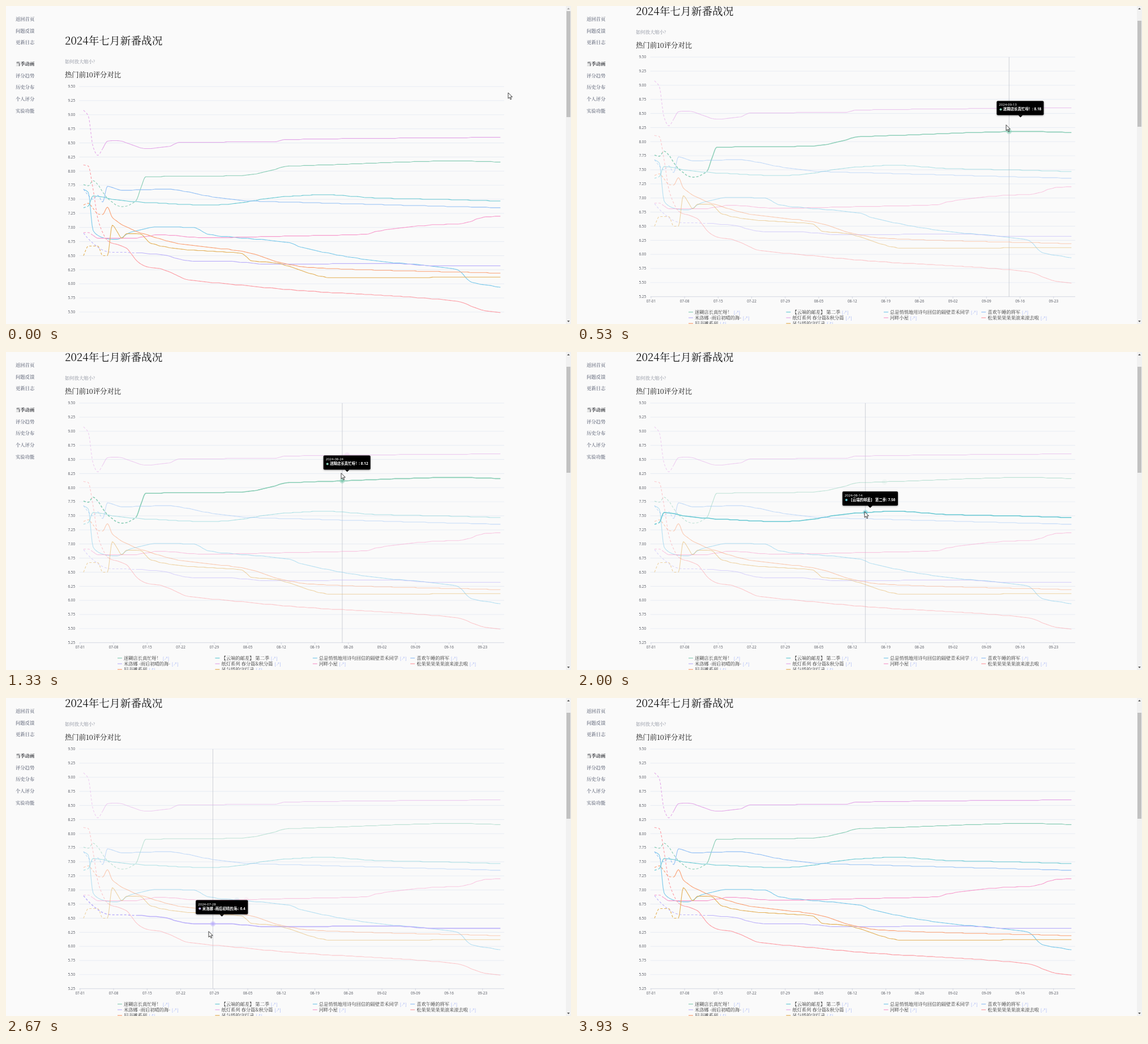
Recreate the animation shown at these times as an HTML page. Size 998 by 561 pixels, loop 4140 ms.

```html
<!DOCTYPE html>
<html lang="zh-CN">
<head>
<meta charset="utf-8">
<style>
html, body { margin: 0; width: 100%; height: 100%; overflow: hidden; background: #fafafa; }
svg { position: absolute; left: 0; top: 0; }
.serif { font-family: "Noto Serif CJK SC", "Noto Serif SC", "Noto Serif", "Noto Sans CJK SC", "Noto Sans CJK", serif; }
.sans { font-family: "Noto Sans", "Noto Sans CJK SC", "Noto Sans CJK", sans-serif; }
#tip {
  position: absolute; left: 0; top: 0; height: 16px; padding: 3px 4.5px 5.5px 4px;
  background: #000; color: #fff; border-radius: 2px; box-shadow: 0 1px 3px rgba(0,0,0,.4);
  font-size: 6.4px; line-height: 8px; font-weight: 700; white-space: pre;
}
#tip::after {
  content: ""; position: absolute; left: 50%; bottom: -4px; margin-left: -4px;
  border: 4px solid transparent; border-top-color: #000; border-bottom: 0;
}
#date { font-size: 6px; font-weight: 500; }
#dot { display: inline-block; width: 4px; height: 4px; border-radius: 50%; margin: 0 3px 1px 0.5px; vertical-align: middle; }
</style>
</head>
<body>
<svg id="stage" width="998" height="561" viewBox="0 0 998 561"></svg>
<div id="tip" class="sans"><div id="date"></div><div><span id="dot"></span><span id="label"></span></div></div>
<svg id="top" width="998" height="561" viewBox="0 0 998 561"></svg>
<script>
const LOOP = 4140, FRAMES = 62, LAST_DAY = 87;
const byId = id => document.getElementById(id);

function add(parent, tag, attrs, text) {
  const el = document.createElementNS('http://www.w3.org/2000/svg', tag);
  for (const k in attrs) el.setAttribute(k, attrs[k]);
  if (text != null) el.textContent = text;
  parent.appendChild(el);
  return el;
}
function write(parent, x, cy, size, fill, text, more) {
  return add(parent, 'text', { x, y: cy + size * 0.36, 'font-size': size, fill, class: 'serif', ...more }, text);
}
const X = day => 136.9 + day * 8.464;
const Y = v => 142.1 + (9.5 - v) * 99.45;
const AXIS = Y(5.25);

// Monotone cubic through the points (d[i], v[i])
function smooth(d, v) {
  const slope = d.slice(1).map((x, i) => (v[i + 1] - v[i]) / (x - d[i]));
  const tan = d.map((_, i) => {
    const a = slope[i - 1] ?? slope[i], b = slope[i] ?? a;
    return a * b <= 0 ? 0 : 2 * a * b / (a + b);
  });
  return x => {
    let i = 0;
    while (i < d.length - 2 && x > d[i + 1]) i++;
    const h = d[i + 1] - d[i], s = (x - d[i]) / h, s2 = s * s, s3 = s2 * s;
    return v[i] * (2 * s3 - 3 * s2 + 1) + v[i + 1] * (3 * s2 - 2 * s3)
      + h * (tan[i] * (s3 - 2 * s2 + s) + tan[i + 1] * (s3 - s2));
  };
}
// A score in hundredths, rounded once a day, from a few turning points (day, score)
function line(name, color, dashEnd, ...points) {
  const trend = smooth(points.filter((_, i) => i % 2 == 0), points.filter((_, i) => i % 2));
  const days = Array.from({ length: LAST_DAY + 1 }, (_, i) => i);
  return { name, color, dashEnd, at: smooth(days, days.map(d => Math.round(trend(d)) / 100)) };
}
const series = [
  line('迷糊店长真忙呀！', '#86ccb4', 11, 0,776, 1,774, 2,783, 5,752, 8,737, 11,748, 13,790, 33,792, 39,801, 42,808, 54,812, 78,818, 87,816),
  line('【云端的邮差】 第二季', '#66c8d2', 1, 0,735, 1,738, 2,756, 7,749, 14,744, 26,740, 30,741, 38,751, 44,756, 50,758, 62,752, 74,750, 87,747),
  line('总是悄悄地用诗句回信的隔壁青禾同学', '#78c8ea', 0, 0,768, 1,762, 2,695, 4,682, 7,679, 10,692, 16,701, 23,700, 26,688, 43,673, 45,666, 60,642, 78,625, 81,603, 87,594),
  line('喜欢午睡的将军', '#92bff5', 4, 0,768, 2,750, 3,757, 4,745, 5,773, 8,766, 17,768, 28,753, 35,747, 43,745, 87,735),
  line('米洛娜 -雨后初晴的海-', '#bdb2fa', 11, 0,690, 2,672, 5,657, 11,655, 16,652, 23,640, 30,640, 38,635, 65,636, 73,632, 87,632),
  line('纸灯系列 春分篇&秋分篇', '#e3a7e8', 4, 0,908, 1,898, 2,843, 3,828, 5,853, 7,854, 13,840, 18,844, 20,851, 40,852, 42,856, 87,860),
  line('河畔小屋', '#f799cc', 2, 0,691, 1,691, 3,681, 10,681, 16,687, 25,682, 44,685, 59,688, 61,693, 72,704, 79,707, 84,719, 87,720),
  line('松果果果果果滚来滚去啦', '#fd9aa2', 5, 0,811, 1,809, 3,715, 5,677, 9,663, 11,642, 13,631, 16,627, 22,607, 30,600, 44,589, 78,569, 83,554, 87,549),
  line('旧书摊系列', '#fa9f72', 4, 0,740, 1,743, 3,724, 4,723, 5,736, 6,718, 10,697, 14,685, 20,671, 33,658, 43,634, 49,628, 87,619),
  line('风与塔的守灯录', '#e3af55', 5, 0,650, 1,667, 3,667, 4,650, 5,650, 6,704, 8,681, 9,689, 12,688, 14,672, 21,661, 33,654, 35,641, 40,637, 52,611, 87,612)
];

// Static page
const stage = byId('stage'), page = add(stage, 'g', {});
write(page, 104, 61, 18.7, '#111', '2024年七月新番战况');
write(page, 104, 98, 8.3, '#858a98', '如何放大缩小?', { 'font-weight': 500 });
write(page, 104, 121.3, 12.35, '#111', '热门前10评分对比', { 'font-weight': 500 });

for (let i = 0; i <= 17; i++) {
  const v = 9.5 - i / 4, y = Y(v);
  add(page, 'path', { d: `M129.5 ${y}H880`, stroke: i == 17 ? '#c4cad8' : '#e0e6f1', 'stroke-width': 0.7 });
  write(page, 122, y, 6.3, '#5c5f68', v.toFixed(2), { class: 'sans', 'text-anchor': 'end' });
}
const dateOf = day => new Date(Date.UTC(2024, 6, 1 + day)).toISOString().slice(0, 10);
for (let week = 0; week <= 12; week++) {
  const x = 130.8 + week * 59.25;
  add(page, 'path', { d: `M${x} ${AXIS}v3`, stroke: '#c4cad8', 'stroke-width': 0.7 });
  write(page, x, AXIS + 7.8, 6.4, '#5c5f68', dateOf(week * 7).slice(5), { class: 'sans', 'text-anchor': 'middle' });
}
const pointer = add(page, 'path', { stroke: '#bcbfc8', 'stroke-width': 0.7 });

function curve(at, from, to) {
  const pts = [];
  for (let d = from; d <= to + 0.01; d += 0.2) pts.push(X(d).toFixed(1) + ' ' + Y(at(d)).toFixed(2));
  return 'M' + pts.join('L');
}
series.forEach((s, i) => {
  s.g = add(page, 'g', { fill: 'none', stroke: s.color, 'stroke-linejoin': 'round' });
  if (s.dashEnd) add(s.g, 'path', { d: curve(s.at, 0, s.dashEnd), 'stroke-dasharray': '4 3' });
  add(s.g, 'path', { d: curve(s.at, s.dashEnd, LAST_DAY) });

  const x = 197 + (i % 4) * 172.4, y = 592.5 + (i >> 2) * 10;
  add(page, 'path', { d: `M${x} ${y - 0.5}h8`, stroke: s.color, 'stroke-width': 1.2 });
  const t = write(page, x + 11, y, 8.25, '#2b2b2b', s.name, { 'font-weight': 500 });
  add(t, 'tspan', { dx: 3, 'font-size': 6.6, fill: '#8fa3f5' }, '[↗]');
});
const dots = add(page, 'g', {});

['返回首页', '问题反馈', '更新日志', '当季动画', '评分趋势', '历史分布', '个人评分', '实验功能'].forEach((s, i) =>
  write(stage, 17, 23 + i * 20.7 + (i > 2 ? 17 : 0), 8.3, i == 3 ? '#33353b' : '#7f8493', s, { 'font-weight': 600 }));

add(stage, 'rect', { x: 989, y: 0, width: 9, height: 561, fill: '#f1f1f1' });
const thumb = add(stage, 'rect', { x: 990, width: 7, height: 187, fill: '#c1c1c1' });
const upArrow = add(stage, 'path', { d: 'M991.2 6l2.3-2.8 2.3 2.8z' });
add(stage, 'path', { d: 'M991.2 555l2.3 2.8 2.3-2.8z', fill: '#505050' });

const cursor = add(byId('top'), 'path', {
  d: 'M0 0V10.2L2.4 8 4 11.9 5.7 11.2 4.1 7.4H7.3Z', fill: '#fff', stroke: '#111', 'stroke-width': 0.8
});

// The cursor's path: time, x, y
const route = [[0, 887, 153], [140, 885, 155], [400, 790, 185], [530, 758, 209.7], [800, 700, 188],
  [1130, 608, 197], [1330, 592, 213.7], [2000, 508, 281.7], [2670, 358, 411.7], [3070, 214, 493],
  [3200, 170, 529], [3670, 74, 570]];
function cursorAt(t) {
  const i = Math.max(1, route.findIndex(k => k[0] >= t));
  const [t0, x0, y0] = route[i - 1], [t1, x1, y1] = route[i];
  const p = Math.max(0, (t - t0) / (t1 - t0));
  return [x0 + (x1 - x0) * p, y0 + (y1 - y0) * p];
}
const scrollAt = t => 52 * (1 - (1 - Math.min(1, t / 340)) ** 3);
const timeOf = i => Math.round(i * 6.667) * 10;

// The chart reacts a little late, to the curve nearest the cursor
function hoverAt(t) {
  const [x, y] = cursorAt(Math.min(t, 3670) - 36);
  if (x > 880 || y > 513) return null;
  const day = Math.min(LAST_DAY, Math.round((x - X(0)) / (X(1) - X(0))));
  const gap = s => Math.abs(Y(s.at(day)) - scrollAt(t) - y);
  return { day, s: series.reduce((a, b) => gap(b) < gap(a) ? b : a) };
}

// Each frame eases from the one before
function buildFrames() {
  const frames = [];
  let look = series.map(() => ({ opacity: 1, width: 1.1, glow: 0, day: 0 })), tip = null;
  for (let i = 0; i <= FRAMES; i++) {
    const t = timeOf(i), hover = hoverAt(t), rate = hover ? 0.85 : 0.4;
    look = look.map((l, k) => {
      const on = hover?.s == series[k];
      return {
        opacity: l.opacity + ((!hover || on ? 1 : 0.52) - l.opacity) * rate,
        width: l.width + ((on ? 1.6 : 1.1) - l.width) * rate,
        glow: on ? 1 : l.glow * 0.65,
        day: on ? hover.day : l.day
      };
    });
    if (hover) {
      const goal = [X(hover.day), Y(hover.s.at(hover.day)) - scrollAt(t) - 9];
      tip = tip ? tip.map((v, k) => v + (goal[k] - v) * 0.5) : goal;
    } else tip = null;
    frames.push({ t, hover, look, tip });
  }
  return frames;
}
const frames = buildFrames();

function draw({ t, hover, look, tip }) {
  const scroll = scrollAt(t);
  page.setAttribute('transform', `translate(0 ${-scroll})`);
  thumb.setAttribute('y', 9 + scroll / 52 * 17);
  upArrow.setAttribute('fill', scroll ? '#505050' : '#a3a3a3');
  cursor.style.display = t < 3670 ? '' : 'none';
  if (t < 3670) cursor.setAttribute('transform', `translate(${cursorAt(t)})`);

  dots.replaceChildren();
  series.forEach((s, i) => {
    const { opacity, width, glow, day } = look[i];
    s.g.setAttribute('opacity', opacity);
    s.g.setAttribute('stroke-width', width);
    if (glow < 0.05) return;
    const cx = X(day), cy = Y(s.at(day));
    add(dots, 'circle', { cx, cy, r: 4.6, fill: s.color, opacity: 0.45 * glow });
    if (glow == 1) add(dots, 'circle', { cx, cy, r: 2.3, fill: s.color });
  });

  pointer.setAttribute('d', hover ? `M${X(hover.day)} ${Y(9.5)}V${AXIS}` : '');
  byId('tip').style.display = hover ? '' : 'none';
  if (!hover) return;
  const { s, day } = hover;
  byId('tip').style.transform = `translate(${tip[0]}px, ${tip[1]}px) translate(-50%, -100%)`;
  byId('date').textContent = dateOf(day);
  byId('dot').style.background = s.color;
  byId('label').textContent = `${s.name}: ${+s.at(day).toFixed(2)}`;
}

// 15 steps a second
const began = performance.now();
function tick() {
  const t = (performance.now() - began) % LOOP;
  draw(frames[Math.floor((t + 5) / 66.6)]);
  requestAnimationFrame(tick);
}
tick();
</script>
</body>
</html>
```
